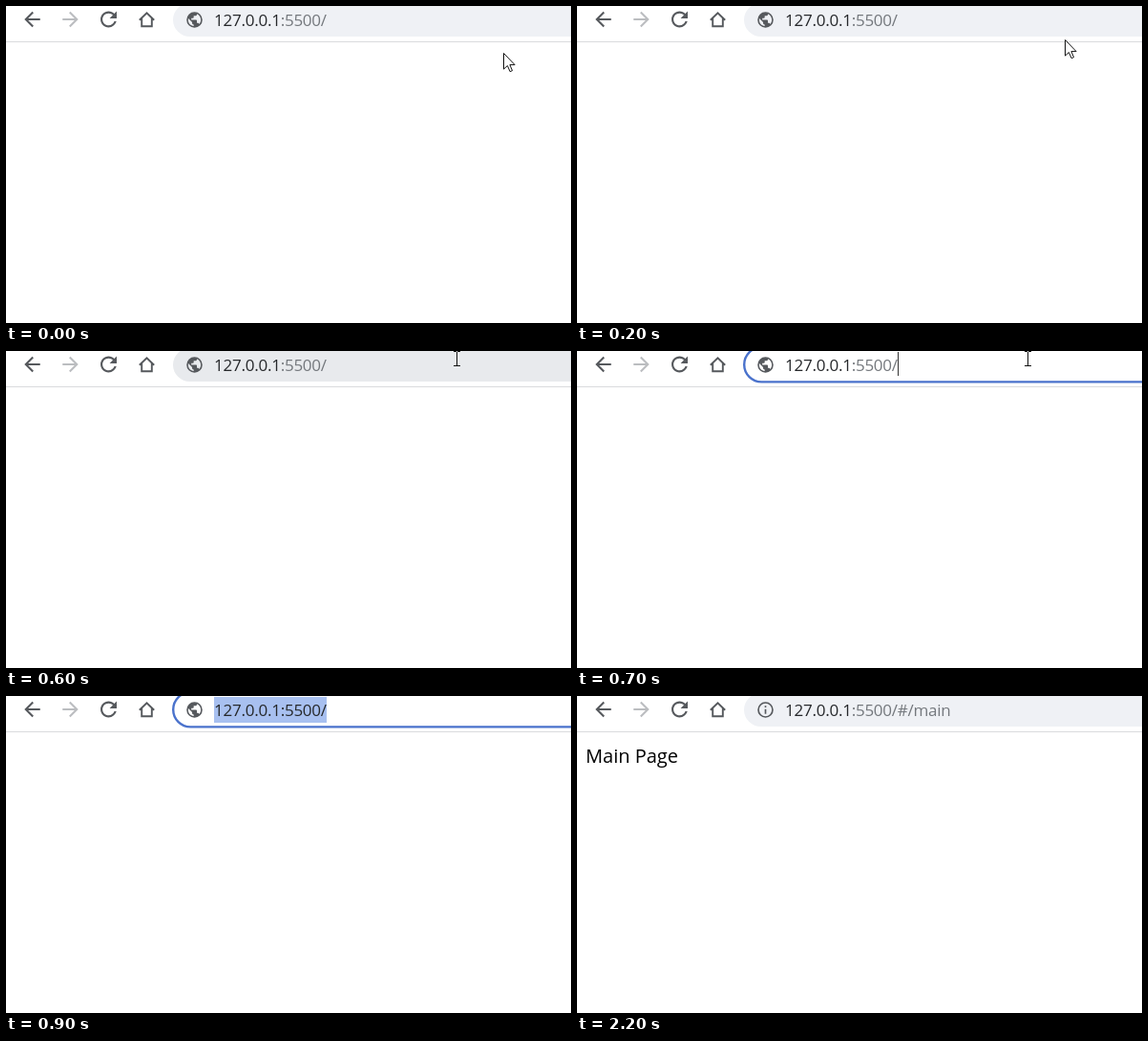
An HTML page with a canvas that plays this animation: 592 px wide and 332 px high, repeating every 4600 ms.

```html
<!DOCTYPE html>
<html lang="en">
<head>
<meta charset="utf-8">
<title>Address bar</title>
<style>
html, body { margin: 0; width: 100%; height: 100%; overflow: hidden; background: #fff; }
canvas { display: block; }
</style>
</head>
<body>
<canvas id="stage" width="592" height="332"></canvas>
<script>
const ctx = document.getElementById('stage').getContext('2d');
const LOOP = 4600, STEP = 100;
const ICON = '#56595d', PALE = '#bbbdc0', INK = '#26282b', GRAY = '#74787d';
const HOST = '127.0.0.1', URL_X = 218;

// 24-unit icon outlines
const shapes = {
  back: 'M20 11H7.83l5.59-5.59L12 4l-8 8 8 8 1.41-1.41L7.83 13H20z',
  reload: 'M17.65 6.35C16.2 4.9 14.21 4 12 4c-4.42 0-8 3.58-8 8s3.58 8 8 8c3.73 0 6.84-2.55 7.73-6h-2.08c-.82 2.33-3.04 4-5.65 4-3.31 0-6-2.69-6-6s2.69-6 6-6c1.66 0 3.14.69 4.22 1.78L13 11h7V4z',
  stop: 'M19 6.41L17.59 5 12 10.59 6.41 5 5 6.41 10.59 12 5 17.59 6.41 19 12 13.41 17.59 19 19 17.59 13.41 12z',
  globe: 'M12 2a10 10 0 1 0 0 20a10 10 0 1 0 0-20zm-1 17.93c-3.95-.49-7-3.85-7-7.93 0-.62.08-1.21.21-1.79L9 15v1c0 1.1.9 2 2 2zm6.9-2.54c-.26-.81-1-1.39-1.9-1.39h-1v-3c0-.55-.45-1-1-1H8v-2h2c.55 0 1-.45 1-1V7h2c1.1 0 2-.9 2-2v-.41c2.93 1.19 5 4.06 5 7.41 0 2.08-.8 3.97-2.1 5.39z',
  info: 'M12 2a10 10 0 1 0 0 20a10 10 0 1 0 0-20zm0 2a8 8 0 1 1 0 16a8 8 0 1 1 0-16zM11 7h2v2h-2zM11 11h2v6h-2z'
};
const icons = Object.fromEntries(Object.entries(shapes).map(([k, d]) => [k, new Path2D(d)]));
const house = new Path2D('M139.8 14.7L147.5 7.3L155.2 14.7M142.2 13V21.2H152.8V13');
const arrow = new Path2D('M0 0V16.6L3.9 13L6.6 19.2L9 18.2L6.4 12.1H11.6Z');

// pointer path: time, x, y
const track = [[0, 521, 49], [100, 518, 44], [200, 511, 35], [300, 500, 25],
  [400, 488, 17], [500, 478, 11], [600, 472, 8]];

function icon(name, x, y, scale, color = ICON, flip = 1) {
  ctx.save();
  ctx.translate(x, y);
  ctx.scale(scale * flip, scale);
  ctx.translate(-12, -12);
  ctx.fillStyle = color;
  ctx.fill(icons[name], 'evenodd');
  ctx.restore();
}

function line(path, color, width) {
  ctx.strokeStyle = color;
  ctx.lineWidth = width;
  ctx.stroke(path);
}

function box(x, y, w, h, color) {
  ctx.fillStyle = color;
  ctx.fillRect(x, y, w, h);
}

function text(str, x, y, size, color, spacing = 0) {
  ctx.font = `${size}px "Open Sans", "Noto Sans", sans-serif`;
  ctx.letterSpacing = spacing + 'px';
  ctx.fillStyle = color;
  ctx.fillText(str, x, y);
  return x + ctx.measureText(str).width;
}

function toolbar(loading) {
  icon('back', 27.5, 14, 1.03);
  icon('back', 67.5, 14, 1.03, PALE, -1);
  icon(loading ? 'stop' : 'reload', 107.5, 14, 1.06);
  line(house, ICON, 1.9);
  box(0, 37, 592, 1, '#dadbdd');
}

function bar(t, focused) {
  const k = Math.max(0, Math.min(1, (t - 200) / 400));
  const hover = t < 2000 ? k : 0;
  const mix = (a, b) => Math.round(a + (b - a) * hover);
  ctx.beginPath();
  if (focused) {
    ctx.roundRect(175.2, -4, 460, 36.4, 18.2);
    ctx.strokeStyle = '#4a72cc';
    ctx.lineWidth = 2.4;
    ctx.stroke();
  } else {
    ctx.roundRect(175, -3, 460, 35, 17.5);
    ctx.fillStyle = `rgb(${mix(239, 232)},${mix(241, 234)},${mix(245, 237)})`;
    ctx.fill();
  }
}

function address(t, selected) {
  const rest = t < 2000 ? ':5500/' : t < 2200 ? ':5500' : ':5500/#/main';
  if (selected) box(URL_X, 1, 118, 27, '#a8c0f0');
  icon(t < 2000 ? 'globe' : 'info', 197.5, 14.5, 0.83);
  const x = text(HOST, URL_X, 21, 17, INK, -0.25);
  text(rest, x, 21, 17, selected ? INK : GRAY, -0.25);
}

function pointer(t) {
  const [, x, y] = track[Math.min(track.length - 1, Math.floor(t / STEP))];
  if (y < 32) {
    box(x, y - 7, 1, 15, '#111');
    for (const dy of [-8, 7]) {
      box(x - 3, y + dy, 3, 1, '#111');
      box(x + 1, y + dy, 3, 1, '#111');
    }
    return;
  }
  ctx.save();
  ctx.translate(x + 0.5, y + 0.5);
  ctx.fillStyle = '#fff';
  ctx.fill(arrow);
  line(arrow, '#111', 1);
  ctx.restore();
}

function draw(now) {
  const t = Math.floor((now % LOOP) / STEP) * STEP;
  const focused = t >= 700 && t < 2000;
  const selected = t >= 800 && t < 2000;
  box(0, 0, 592, 332, '#fff');
  toolbar(t >= 2000 && t < 2200);
  bar(t, focused);
  address(t, selected);
  if (focused && !selected) box(336, 1, 1, 25, '#333');
  if (t < 900) pointer(t);
  if (t >= 2200) text('Main Page', 9, 70, 20, '#000');
}

let start;
function tick(now) {
  start ??= now;
  draw(now - start);
  requestAnimationFrame(tick);
}
draw(0);
requestAnimationFrame(tick);
</script>
</body>
</html>
```
